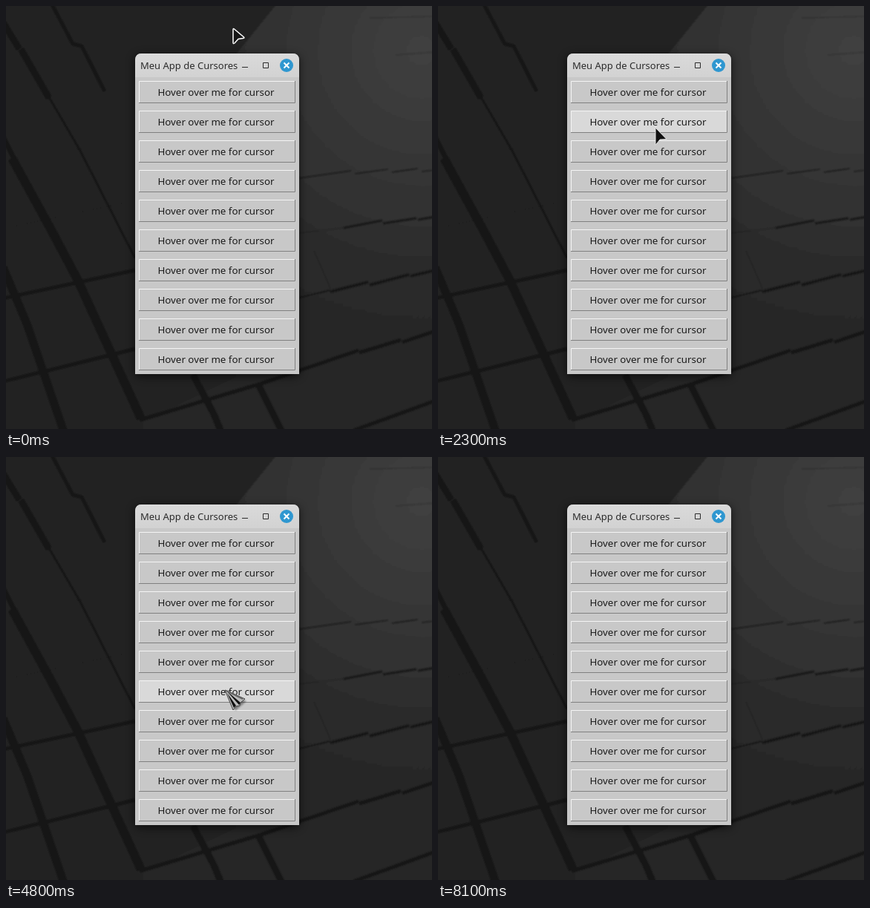
Recreate the animation shown at these times as an HTML page. Size 574 px wide and 570 px high, loop 8400 ms.

```html
<!DOCTYPE html>
<html lang="pt">
<head>
<meta charset="utf-8">
<title>Meu App de Cursores</title>
<style>
html, body { margin: 0; width: 100%; height: 100%; overflow: hidden; background: #232323; }
svg { display: block; }
text { font: 13.33px "Noto Sans", sans-serif; fill: #1b1b1b; }
.wall path { fill: none; stroke: #161616; }
</style>
</head>
<body>
<svg width="574" height="570" viewBox="0 0 574 570">
  <defs>
    <radialGradient id="light" gradientUnits="userSpaceOnUse" cx="560" cy="60" r="430">
      <stop offset="0" stop-color="#404040"/>
      <stop offset=".35" stop-color="#363636"/>
      <stop offset=".7" stop-color="#2b2b2b"/>
      <stop offset="1" stop-color="#262626"/>
    </radialGradient>
    <linearGradient id="bar" x2="0" y2="1">
      <stop offset="0" stop-color="#dadada"/>
      <stop offset="1" stop-color="#d2d2d2"/>
    </linearGradient>
    <linearGradient id="metal" x2="1" y2="1">
      <stop offset="0" stop-color="#666"/>
      <stop offset=".3" stop-color="#d0d0d0"/>
      <stop offset=".6" stop-color="#777"/>
      <stop offset="1" stop-color="#333"/>
    </linearGradient>
    <filter id="soft"><feGaussianBlur stdDeviation=".8"/></filter>
    <filter id="shade" x="-20%" y="-20%" width="140%" height="140%"><feGaussianBlur stdDeviation="6"/></filter>
  </defs>

  <g class="wall" filter="url(#soft)">
    <rect x="-9" y="-9" width="592" height="588" fill="#232323"/>
    <polygon points="370,-9 310,65 310,500 185,560 185,580 584,580 584,-9" fill="url(#light)"/>
    <g stroke-width="9">
      <path d="M-4 22L18 58M20 58L58 124"/>
      <path d="M-4 176L12 208" stroke-width="7"/>
      <path d="M8 205L60 300L96 368L182 556" stroke-width="12"/>
      <path d="M-4 352L28 428L78 574" stroke-width="11"/>
      <path d="M252 497L280 550L290 574M340 510L372 574"/>
    </g>
    <g stroke-width="5">
      <path d="M62 -2L90 51L102 54L133 115"/>
      <path d="M-4 394L174 356M-4 506L110 478L174 462"/>
      <path d="M180 558L340 510L475 464M476 467L532 450M534 453L578 438M468 572L578 532"/>
      <path d="M437 385L488 372M490 376L543 362M545 364L578 356" stroke-width="4"/>
    </g>
    <path d="M455 299L507 289M508 293L553 286M555 288L578 284" stroke-width="3"/>
    <path d="M58 123L100 195L174 340" stroke-width="3"/>
    <path d="M395 393L437 383" stroke-width="2"/>
    <path d="M395 232L465 222M470 226L515 220M520 224L555 219M560 223L578 221" stroke-width="1.3"/>
    <path d="M-4 300L174 262M90 194L174 182M395 306L455 299M415 330L437 380M490 16L578 14M525 66L578 62" stroke-opacity=".5"/>
  </g>

  <rect x="173" y="66" width="223" height="434" rx="8" opacity=".55" filter="url(#shade)"/>
  <path d="M174 496V73Q174 64 183 64H386Q395 64 395 73V496Z" fill="#c8c8c8"/>
  <path d="M174 96V73Q174 64 183 64H386Q395 64 395 73V96Z" fill="url(#bar)"/>
  <text x="181" y="85" style="font-size:13px;fill:#2c2c2c">Meu App de Cursores</text>
  <path d="M318 82.5H326M346.500 76.500H353.500V83.500H346.500Z" fill="none" stroke="#2c2c2c"/>
  <circle cx="378" cy="80" r="9" fill="#2f97d0"/>
  <path d="M374.500 76.500L381.500 83.500M381.500 76.500L374.500 83.500" stroke="#fff" stroke-width="2"/>
  <g id="buttons"></g>

  <g id="cursor">
    <path id="desktop" d="M1 1.500Q1 0 2.500 1L15.500 12Q16.500 13.500 14.500 13.500L8 14.500L3 20Q1 21.500 1 19.500Z" fill="#151515" stroke="#fff" stroke-width="1.5"/>
    <path id="arrow" d="M0 0V23.500L6 16L15 15.500Z" fill="#111" stroke="#e8e8e8"/>
    <g id="question">
      <path d="M3 3L14 12L10 13L13 19L9 21L7 15L4 18Z" opacity=".45" filter="url(#soft)"/>
      <path d="M0 0L11 9.500L7 10.500L10 17L7 18.500L4.500 12.500L1 15.500Z" fill="#cf3b38" stroke="#5c3332"/>
      <text x="13" y="12" style="font-size:11px;font-style:italic;fill:#888">??</text>
    </g>
    <g id="silver">
      <path d="M2 2L29 15L14 28Z" opacity=".35" filter="url(#soft)"/>
      <path d="M0 0L27 12L21 17L20 21L15 22L11 27Z" fill="#bbb" stroke="#444"/>
      <path d="M2 1L21 17L19 20ZM3 4L15 21L12 24Z" fill="#111"/>
      <path d="M2 1L24 12" stroke="#666" stroke-width="2"/>
    </g>
    <g id="shuttle">
      <path d="M-5 2H15M5 4L1 13H9Z" fill="#777" stroke="#788578" stroke-width="3" opacity=".35"/>
      <rect x="-10.500" y="-1.500" width="21" height="3" fill="#a4aaa8" stroke="#444"/>
      <path d="M0 4L-3.500 11.500H3.500Z" fill="#c8372f" stroke="#522"/>
      <circle r="3" fill="#d03530" stroke="#5a2020"/>
    </g>
    <g id="target">
      <circle r="19" fill="url(#metal)" stroke="#4a4a4a"/>
      <circle r="14" fill="#202326" stroke="#aaa" stroke-width="2"/>
      <path d="M-6 -12L0 -9L6 -12L12 -6L9 0L12 6L6 12L0 9L-6 12L-12 6L-9 0L-12 -6Z" fill="#378fc5"/>
      <path d="M-4 -7H5M-2 -5H4" stroke="#e4f1f8" stroke-width="1.5" stroke-dasharray="2 1"/>
      <path d="M-7 7L0 3L7 7" fill="none" stroke="#2470a0" stroke-width="2"/>
    </g>
  </g>
</svg>
<script>
const LOOP = 8400, STEP = 100;
// time, x, y of the pointer's hot spot
const route = [
  [0, 305, 30], [900, 301, 92], [1600, 297, 132], [1800, 296, 136], [2700, 290, 187],
  [3000, 289, 204], [3600, 291, 238], [4500, 295, 293], [4800, 295, 314], [5400, 290, 353],
  [6000, 286, 382], [6300, 285, 402], [6800, 285, 437], [7200, 285, 484], [7900, 285, 580], [LOOP, 285, 580]
];
const hoverCursors = { 2: "question", 5: "silver", 7: "shuttle", 8: "target" };
const cursor = document.getElementById("cursor");
const rowTop = row => 101 + row * 40;

document.getElementById("buttons").innerHTML = Array.from({ length: 10 }, (_, row) => `
  <g transform="translate(179 ${rowTop(row)})">
    <rect width="211" height="30" fill="#c8c8c8"/>
    <path d="M.5 30V.5H211" fill="none" stroke="#f4f4f4"/>
    <path d="M0 29.500H210.500V0" fill="none" stroke="#808080"/>
    <text x="104" y="20" text-anchor="middle">Hover over me for cursor</text>
  </g>`).join("");
const faces = document.querySelectorAll("#buttons rect");

function pointerAt(time) {
  const next = route.findIndex(point => point[0] > time);
  const [t0, x0, y0] = route[next - 1], [t1, x1, y1] = route[next];
  const part = (time - t0) / (t1 - t0);
  return [x0 + (x1 - x0) * part, y0 + (y1 - y0) * part].map(Math.round);
}

function draw(now) {
  const [x, y] = pointerAt(Math.floor(now % LOOP / STEP) * STEP);
  const hovered = [...faces].findIndex((_, row) => y >= rowTop(row) && y < rowTop(row) + 30);
  const shown = y < 64 || y >= 496 ? "desktop" : hoverCursors[hovered] || "arrow";
  faces.forEach((face, row) => face.setAttribute("fill", row === hovered ? "#d9d9d9" : "#c8c8c8"));
  for (const shape of cursor.children) shape.style.display = shape.id === shown ? "" : "none";
  cursor.setAttribute("transform", `translate(${x} ${y})`);
  requestAnimationFrame(draw);
}
draw(performance.now());
</script>
</body>
</html>
```
